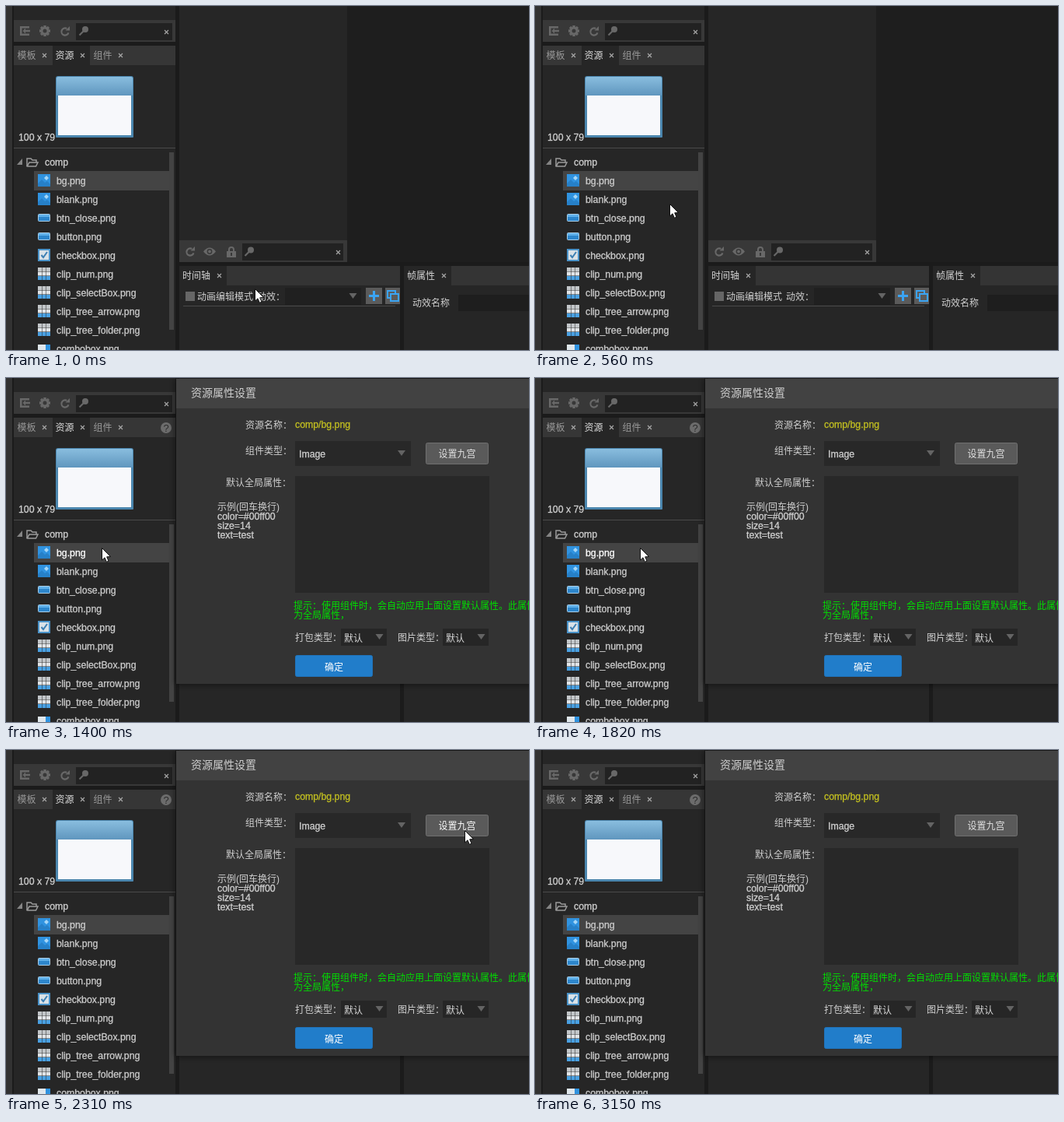
An HTML page with a canvas for the animation above (3.85 s loop, 673 by 442 pixels).

```html
<!DOCTYPE html>
<html lang="zh">
<head>
<meta charset="utf-8">
<style>
html, body { margin: 0; width: 100%; height: 100%; overflow: hidden; background: #1e1e1e; }
canvas { display: block; }
</style>
</head>
<body>
<canvas id="stage" width="673" height="442"></canvas>
<script>
const g = document.getElementById('stage').getContext('2d');
const LOOP = 3850, STEP = 70;
const FONT = '"Liberation Sans", Arial, "Noto Sans CJK SC", "Noto Sans CJK", sans-serif';
const PANEL = '#262626', GAP = '#1b1b1b', BAR = '#383838', ICON = '#686868', BLUE = '#3093e0';

function box(x, y, w, h, color) {
  g.fillStyle = color;
  g.fillRect(x, y, w, h);
}

function round(x, y, w, h, r, fill, stroke, width = 1) {
  g.beginPath();
  g.roundRect(x, y, w, h, r);
  if (fill) { g.fillStyle = fill; g.fill(); }
  if (stroke) { g.strokeStyle = stroke; g.lineWidth = width; g.stroke(); }
}

function text(str, x, y, color = '#d0d0d0', size = 12, align = 'left') {
  g.font = size + 'px ' + FONT;
  g.textAlign = align;
  g.fillStyle = color;
  g.fillText(str, x, y);
}

// Latin labels are a touch larger and heavier than the Chinese ones
function latin(str, x, y, color = '#d0d0d0') {
  text(str, x, y, color, 12.3);
  g.strokeStyle = color;
  g.lineWidth = 0.3;
  g.strokeText(str, x, y);
}

function poly(points, color) {
  g.beginPath();
  points.forEach(([x, y]) => g.lineTo(x, y));
  g.closePath();
  g.fillStyle = color;
  g.fill();
}

function line(points, color, width) {
  g.beginPath();
  points.forEach(([x, y]) => g.lineTo(x, y));
  g.strokeStyle = color;
  g.lineWidth = width;
  g.stroke();
}

function disc(x, y, r, color) {
  g.beginPath();
  g.arc(x, y, r, 0, Math.PI * 2);
  g.fillStyle = color;
  g.fill();
}

function at(x, y, draw) {
  g.save();
  g.translate(x, y);
  draw();
  g.restore();
}

// Small interface icons, drawn around their centre
const cross = (x, y) => at(x, y, () => {
  line([[-2.5, -2.5], [2.5, 2.5]], '#aaa', 1.1);
  line([[2.5, -2.5], [-2.5, 2.5]], '#aaa', 1.1);
});

const arrow = (x, y) => poly([[x - 5, y - 4], [x + 5, y - 4], [x, y + 3]], '#646464');

const refresh = (x, y) => at(x, y, () => {
  g.beginPath();
  g.arc(0, 1, 4.6, 0.3, 5.2);
  g.strokeStyle = ICON;
  g.lineWidth = 2.2;
  g.stroke();
  poly([[0.5, -0.5], [6, -6], [6, -0.5]], ICON);
});

const magnifier = (x, y) => at(x, y, () => {
  disc(2, -2, 4, ICON);
  line([[0, 0], [-5.5, 5.5]], ICON, 2.2);
});

const gear = (x, y) => at(x, y, () => {
  for (let i = 0; i < 8; i++) {
    g.rotate(Math.PI / 4);
    box(-1.7, -7, 3.4, 4, ICON);
  }
  g.beginPath();
  g.arc(0, 0, 4, 0, Math.PI * 2);
  g.strokeStyle = ICON;
  g.lineWidth = 3;
  g.stroke();
});

const importIcon = (x, y) => at(x, y, () => {
  box(-6, -6, 12, 12, ICON);
  box(-3.5, -3.5, 10, 7, BAR);
  poly([[-2.5, 0], [1, -3.5], [1, -1.2], [7, -1.2], [7, 1.2], [1, 1.2], [1, 3.5]], ICON);
});

const eye = (x, y) => at(x, y, () => {
  g.beginPath();
  g.moveTo(-8, 0);
  g.quadraticCurveTo(0, -10, 8, 0);
  g.quadraticCurveTo(0, 10, -8, 0);
  g.fillStyle = ICON;
  g.fill();
  disc(0, 0, 3.4, BAR);
  disc(0, 0, 1.9, ICON);
});

const lock = (x, y) => at(x, y, () => {
  round(-3, -6, 6, 8, 3, null, ICON, 2);
  box(-6, -1, 12, 8, ICON);
  box(-1, 1, 2, 4, BAR);
});

const help = (x, y) => {
  disc(x, y, 7, '#6c6c6c');
  text('?', x, y + 4.5, '#2c2c2c', 13, 'center');
};

function folder() {
  line([[27, 206], [27, 196], [32, 196], [34, 198], [39, 198], [39, 201]], '#9a9a9a', 1.5);
  line([[27, 206], [30, 201], [41, 201], [38.5, 206], [26.5, 206]], '#9a9a9a', 1.5);
}

// Resource list icons, all centred in a 16px cell
const fileIcon = {
  image() {
    box(-8, -8, 16, 16, BLUE);
    poly([[-8, 4], [-3, -1], [1, 3], [4, 1], [8, 5], [8, 8], [-8, 8]], '#2680c8');
    poly([[0, -3], [3, -6], [6, -3], [3, 0]], '#a4d6f7');
  },
  button() {
    round(-7.5, -4.5, 15, 9, 1, '#2d86cc', '#a9cde6');
    box(-7, -4, 14, 3, '#5fb0ea');
  },
  check() {
    box(-8, -8, 16, 16, '#4b93c8');
    box(-6, -6, 12, 12, '#d9e2e8');
    line([[-3.5, 0], [-1, 3], [4, -4]], '#3f80b3', 2);
  },
  clip() {
    ['#c2c6c9', '#e2e5e8', '#49a0e2'].forEach((color, row) => {
      for (let col = 0; col < 3; col++) box(-8 + col * 5.5, -8 + row * 5.5, 5, 5, color);
    });
  },
  combo() {
    box(-8, -5, 16, 10, '#dfe7ec');
    box(2, -5, 6, 10, BLUE);
  }
};

const files = [
  ['bg', 'image'], ['blank', 'image'], ['btn_close', 'button'], ['button', 'button'],
  ['checkbox', 'check'], ['clip_num', 'clip'], ['clip_selectBox', 'clip'],
  ['clip_tree_arrow', 'clip'], ['clip_tree_folder', 'clip'], ['combobox', 'combo']
];

function preview() {
  const sky = g.createLinearGradient(0, 90, 0, 115);
  sky.addColorStop(0, '#8bbfe0');
  sky.addColorStop(1, '#5f96be');
  round(64, 90, 100, 79, [3, 3, 1, 1], '#4b86ae');
  round(65, 91, 98, 24, [2, 2, 0, 0], sky);
  box(67, 115, 94, 51, '#f7f8fb');
}

function leftPanel(hover, showHelp) {
  box(0, 0, 8, 442, '#323232');
  box(8, 0, 2, 442, GAP);
  box(10, 0, 208, 442, PANEL);
  box(10, 18, 208, 28, BAR);
  box(90, 22, 124, 22, '#222');
  importIcon(24, 32);
  gear(50, 32);
  refresh(76, 32);
  magnifier(100, 32);
  cross(206.5, 33.5);

  box(10, 46, 208, 5, GAP);
  box(10, 51, 208, 25, '#363636');
  box(60, 51, 48, 25, PANEL);
  [['模板', 14.5, '#999'], ['资源', 63.5, '#ddd'], ['组件', 112.5, '#999']].forEach(([name, x, color]) => {
    text(name, x, 68, color);
    cross(x + 35, 63.5);
  });
  if (showHelp) help(206, 64);

  preview();
  latin('100 x 79', 16, 173);
  box(10, 182, 208, 1, '#4a4a4a');
  box(210, 188, 6, 228, '#434343');

  poly([[14, 204], [21, 196], [21, 204]], '#858585');
  folder();
  latin('comp', 50, 205);

  box(36, 212, 174, 25, '#444');
  files.forEach(([name, icon], i) => {
    const y = 224 + i * 24;
    at(49, y, fileIcon[icon]);
    latin(name + '.png', 65, y + 5, i === 0 && hover ? '#fff' : '#cdcdcd');
  });
}

function workspace() {
  box(218, 0, 455, 442, GAP);
  box(223, 0, 216, 301, PANEL);
  box(439, 0, 234, 329, '#1e1e1e');
  box(223, 301, 216, 28, BAR);
  box(304, 305, 130, 22, '#222');
  refresh(237, 315);
  eye(262, 315.5);
  lock(290, 316);
  magnifier(313, 315.5);
  cross(427.5, 316.5);

  box(223, 334, 284, 108, PANEL);
  box(284, 334, 223, 25, '#343434');
  text('时间轴', 227, 351, '#d4d4d4');
  cross(274.5, 346.5);
  box(231, 367, 12, 12, '#666');
  text('动画编辑模式', 246, 378);
  text('动效：', 323, 378);
  box(359, 362, 98, 22, '#202020');
  arrow(446.5, 373);
  box(463, 362, 21, 21, '#5b5b5b');
  box(467, 371, 13, 3, '#3ba4f3');
  box(472, 366, 3, 13, '#3ba4f3');
  box(488, 362, 19, 21, '#5b5b5b');
  g.strokeStyle = '#3ba4f3';
  g.lineWidth = 2;
  g.strokeRect(491, 366, 10, 9);
  box(494, 369, 12, 11, '#5b5b5b');
  g.strokeRect(495, 370, 10, 9);
  box(228, 385, 273, 1, '#4a4a4a');

  box(512, 334, 161, 108, PANEL);
  box(573, 334, 100, 25, '#343434');
  text('帧属性', 516, 351, '#d4d4d4');
  cross(563.5, 346.5);
  text('动效名称', 523, 386);
  box(582, 371, 91, 21, '#1e1e1e');
}

function dialog(hover) {
  g.save();
  g.shadowColor = 'rgba(0,0,0,.65)';
  g.shadowBlur = 9;
  box(219, 1, 470, 392, '#333');
  g.restore();
  box(219, 1, 454, 38, '#424242');
  text('资源属性设置', 238, 24, '#d0d0d0', 14);

  text('资源名称：', 308, 64.5);
  latin('comp/bg.png', 372, 64, '#c3c021');
  text('组件类型：', 308, 98);
  box(372, 81, 149, 32, '#282828');
  latin('Image', 377, 102);
  arrow(509, 97);
  round(540.5, 83.5, 80, 27, 2, '#5a5a5a', '#707070');
  text('设置九宫', 580.5, 102, hover ? '#fff' : '#e4e4e4', 12, 'center');

  text('默认全局属性：', 283, 138.5);
  box(372, 126, 250, 150, '#282828');
  text('示例(回车换行)', 272, 170);
  ['color=#00ff00', 'size=14', 'text=test'].forEach((row, i) => latin(row, 272, 182 + i * 12));

  text('提示：使用组件时，会自动应用上面设置默认属性。此属性', 370, 297, '#00e000');
  text('为全局属性，', 370, 308.5, '#00e000');

  [['打包类型：', 372, 431], ['图片类型：', 504, 562]].forEach(([label, x, left]) => {
    text(label, x, 338);
    box(left, 322, 59, 22, '#262626');
    text('默认', left + 4, 338.5, '#d8d8d8');
    arrow(left + 49.5, 333);
  });

  round(372.5, 356.5, 99, 27, 2, '#217dca', '#1f74bc');
  text('确定', 422, 375.5, '#fff', 12, 'center');
}

function pointer(x, y) {
  at(x, y, () => {
    g.beginPath();
    [[0.5, 0.5], [0.5, 16], [4, 12.8], [6.4, 18.3], [9, 17.2], [6.7, 11.8], [11.6, 11.6]]
      .forEach(([px, py]) => g.lineTo(px, py));
    g.closePath();
    g.fillStyle = '#fff';
    g.fill();
    g.strokeStyle = '#111';
    g.lineWidth = 1;
    g.stroke();
  });
}

// time, x, y, easing of the way to this point
const linear = p => p;
const smooth = p => p * p * (3 - 2 * p);
const path = [
  [0, 320, 363, linear], [70, 320, 363, linear], [210, 298, 345, p => p ** 1.4],
  [350, 249, 307, linear], [630, 148, 236, linear], [700, 126, 219, linear],
  [770, 123, 218, linear], [1750, 123, 218, linear], [1820, 135, 218, linear],
  [2310, 590, 103, smooth], [2450, 590, 103, linear], [2730, 583, 250, p => p ** 1.5],
  [3010, 590, 427, p => 1 - (1 - p) ** 1.3], [3080, 590, 437, linear], [3150, 591, 460, linear]
];

function pointerAt(t) {
  const i = path.findIndex(k => k[0] > t);
  if (i < 0) return path[path.length - 1].slice(1, 3);
  const a = path[i - 1], b = path[i];
  const p = b[3]((t - a[0]) / (b[0] - a[0]));
  return [1, 2].map(n => Math.round(a[n] + (b[n] - a[n]) * p));
}

function draw(now) {
  const t = Math.floor((now % LOOP) / STEP) * STEP;
  const [x, y] = pointerAt(t);
  const rowHover = t >= 700 && x < 210 && y >= 212 && y < 237;
  const buttonHover = x >= 540 && x < 621 && y >= 83 && y < 111;
  g.clearRect(0, 0, 673, 442);
  workspace();
  leftPanel(rowHover, t >= 700);
  if (t >= 1400) dialog(buttonHover);
  pointer(x, y);
}

const start = performance.now();
function tick() {
  draw(performance.now() - start);
  requestAnimationFrame(tick);
}
tick();
</script>
</body>
</html>
```
